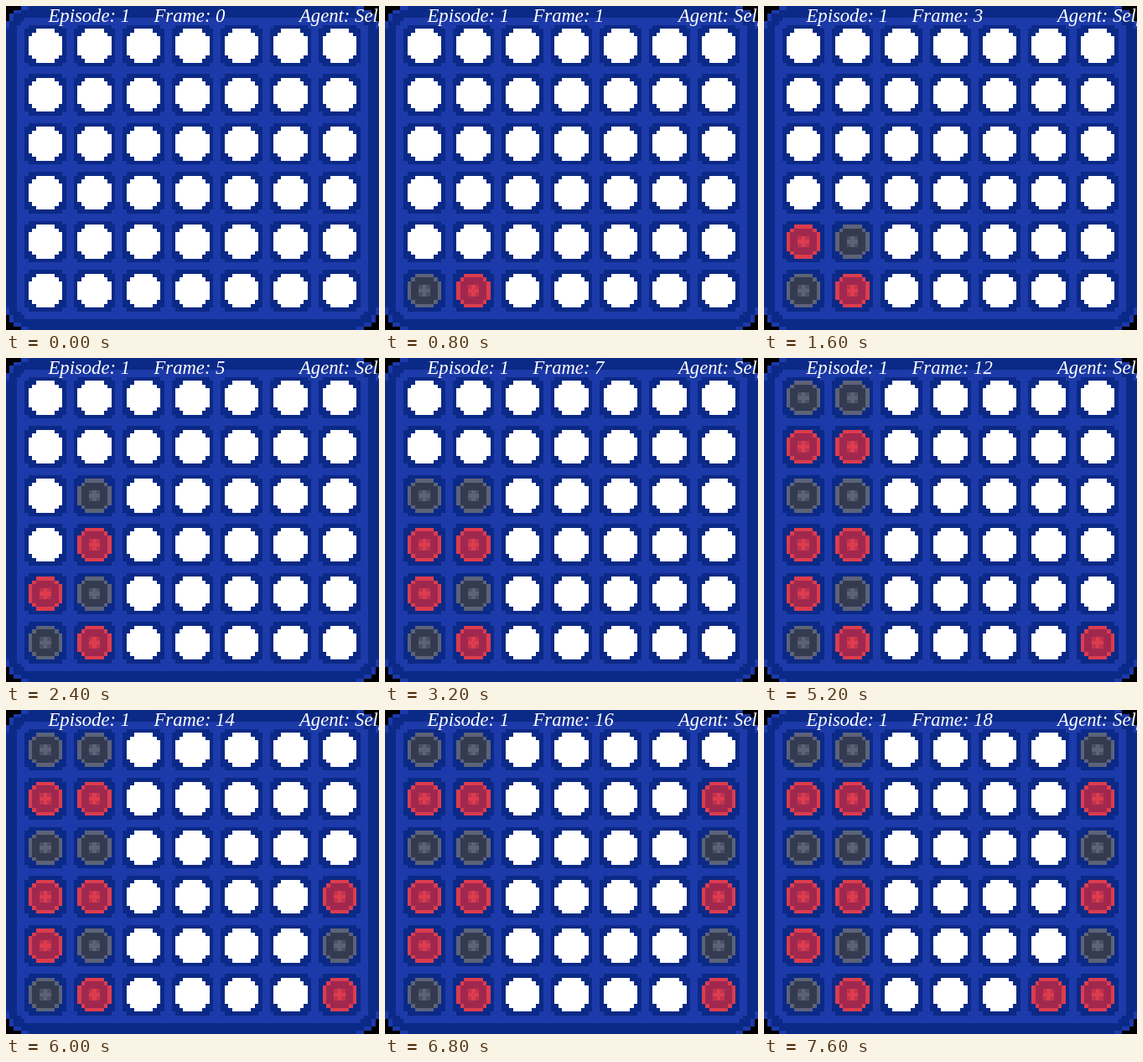
An HTML page for the animation above (8000 ms loop, 445x387 px).

```html
<!DOCTYPE html>
<html lang="en">
<head>
<meta charset="utf-8">
<title>Four in a row</title>
<style>
  html, body { margin: 0; width: 100%; height: 100%; overflow: hidden; background: #000; }
  svg { display: block; width: 100%; height: 100%; }
  text { font: italic 22.67px "Liberation Serif", "Times New Roman", serif; fill: #fff; white-space: pre; }
</style>
</head>
<body>
<svg id="stage" viewBox="0 0 445 387" preserveAspectRatio="none">
  <g id="board" shape-rendering="crispEdges"></g>
  <text x="50.5" y="18.5">Episode: 1</text>
  <text id="count" x="176.5" y="18.5">Frame: 0</text>
  <text x="350" y="18.5">Agent: Self</text>
</svg>
<script>
const W = 99, H = 86, STEP = 400, LOOP = 8000;
const BLUE = '#1c3aa9', NAVY = '#0b2986';
const RED = { a: '#dc3c4e', b: '#a0284e', c: '#c0334e' };
const GREY = { a: '#5c6378', b: '#343a50', c: '#4a5066' };
const DISC = [
  '..aaaaa..',
  '.abbbbba.',
  'abbbbbbba',
  'abbcacbba',
  'abbaaabba',
  'abbcacbba',
  'abbbbbbba',
  '.abbbbba.',
  '..aaaaa..'
];
// Columns played, in order; red moves first.
const MOVES = [1, 0, 0, 1, 1, 1, 0, 0, 0, 0, 1, 1, 6, 6, 6, 6, 6, 6, 5];

const board = document.getElementById('board');
const count = document.getElementById('count');
board.setAttribute('transform', `scale(${445 / W} ${387 / H})`);

function path(parent, d, fill) {
  const el = document.createElementNS('http://www.w3.org/2000/svg', 'path');
  el.setAttribute('d', d);
  el.setAttribute('fill', fill);
  parent.appendChild(el);
  return el;
}

const box = (x, y, w, h) => `M${x} ${y}h${w}v${h}h${-w}z`;

// Box with stepped corners; insets[i] is the cut on row i from the top and bottom.
function stepped(x, y, w, h, insets) {
  const n = insets.length;
  return box(x, y + n, w, h - 2 * n) + insets.map((cut, i) =>
    box(x + cut, y + i, w - 2 * cut, 1) +
    box(x + cut, y + h - 1 - i, w - 2 * cut, 1)).join('');
}

const cellX = col => 5 + col * 13;
const cellY = row => 5 + row * 13;

function drawBoard() {
  path(board, box(0, 0, W, H), '#000');
  path(board, stepped(0, 0, W, H, [4, 2, 1, 1]), BLUE);
  path(board, stepped(0, 0, W, H, [6, 4, 2, 2, 1, 1]), NAVY);
  path(board, stepped(3, 3, W - 6, H - 6, [2, 1]), BLUE);
  let frames = '', holes = '';
  for (let row = 0; row < 6; row++) {
    for (let col = 0; col < 7; col++) {
      const x = cellX(col), y = cellY(row);
      frames += stepped(x, y, 11, 11, [1]);
      holes += stepped(x + 1, y + 1, 9, 9, [2, 1]);
    }
  }
  path(board, frames, NAVY);
  path(board, holes, '#fff');
}

function makeDisc(col, row, colors) {
  const g = document.createElementNS('http://www.w3.org/2000/svg', 'g');
  for (const key in colors) {
    let d = '';
    DISC.forEach((line, j) => [...line].forEach((ch, i) => {
      if (ch === key) d += box(cellX(col) + 1 + i, cellY(row) + 1 + j, 1, 1);
    }));
    path(g, d, colors[key]);
  }
  board.appendChild(g);
  return g;
}

drawBoard();
const heights = Array(7).fill(0);
const discs = MOVES.map((col, i) =>
  makeDisc(col, 5 - heights[col]++, i % 2 ? GREY : RED));

function render(time) {
  const played = Math.floor((time % LOOP) / STEP);
  discs.forEach((disc, i) => disc.setAttribute('visibility', i < played ? 'visible' : 'hidden'));
  count.textContent = 'Frame: ' + Math.max(0, played - 1);
}

const start = performance.now();
function tick() {
  render(performance.now() - start);
  requestAnimationFrame(tick);
}
tick();
</script>
</body>
</html>
```
